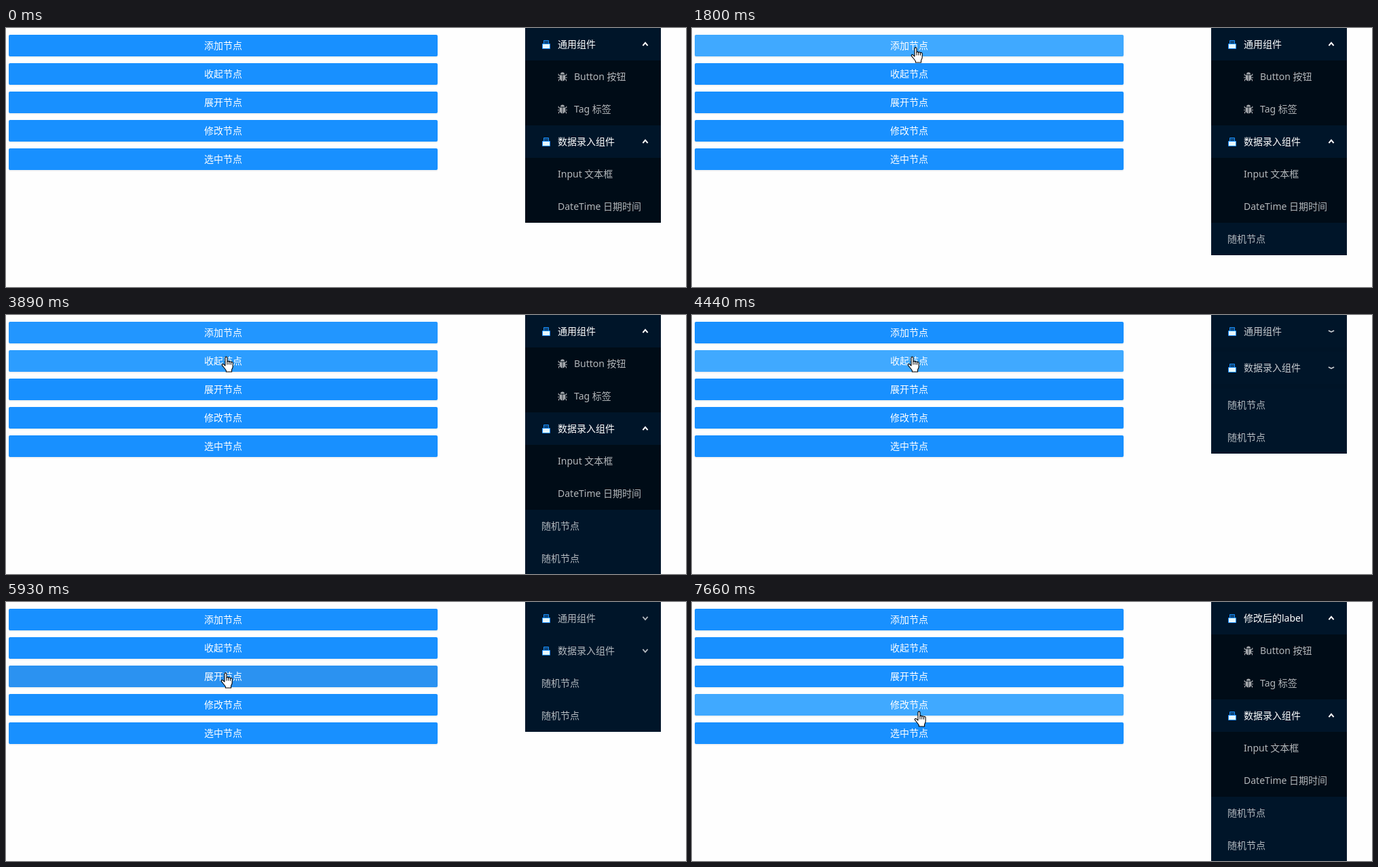
These frames come from a looping animation (1002 by 383 pixels, 8000 ms). An HTML page:

```html
<!DOCTYPE html>
<html lang="zh-CN">
<head>
<meta charset="utf-8">
<title>菜单节点</title>
<style>
  html, body { margin: 0; width: 100%; height: 100%; overflow: hidden; background: #fefefe; }
  body { position: relative; font: 14px 'Noto Sans', 'Noto Sans CJK SC', sans-serif; }
  svg { position: absolute; overflow: visible; }
  .button {
    position: absolute; left: 4px; width: 632px; height: 32px; line-height: 32px;
    border-radius: 2px; box-shadow: 0 2px 0 rgba(0, 0, 0, .045);
    color: #fff; text-align: center;
  }
  #menu { position: absolute; left: 765px; top: 0; width: 200px; background: #001529; color: rgba(255, 255, 255, .7); }
  .item { position: relative; height: 48px; line-height: 48px; padding-left: 24px; white-space: pre; }
  .item svg { top: 17px; width: 14px; height: 14px; }
  .icon { padding-left: 48px; }
  .icon svg:first-child { left: 24px; }
  .sub { overflow: hidden; background: #000c17; }
  .sub .item { padding-left: 48px; }
  .sub .icon { padding-left: 72px; }
  .sub .icon svg { left: 48px; }
  .item .arrow { left: 177px; top: 24px; width: 1px; height: 1px; }
</style>
</head>
<body>
<div id="menu"></div>
<svg id="cursor" width="18" height="24" fill="#fff" stroke="#000" stroke-linejoin="round">
  <path id="pointer" d="M.5.5V16.5L4.2 13 6.6 18.6 9 17.6 6.6 12H11.5Z"/>
  <g id="hand">
    <path stroke-width="1.1" d="M6 14V2.4a1.5 1.5 0 0 1 3 0V8.4a1.4 1.4 0 0 1 2.8.3 1.4 1.4 0 0 1 2.7.7 1.4 1.4 0 0 1 2.7.8V15.5c0 2-1.3 3-1.6 4.7V23H7.4V21.3c-.8-2-3.4-4.6-5.8-7.6-1.2-1.7.7-2.9 2-1.9Z"/>
    <path fill="none" d="M9 8.5v4M11.8 9v3.5M14.5 9.6v3"/>
  </g>
</svg>
<script>
const usb = `<svg viewBox="0 0 14 14" stroke="#1890ff">
  <path fill="#0b3a66" d="M3.5 7V1.5H10.5V7"/><path d="M5.2 3.8h1M7.8 3.8h1"/>
  <path fill="#e6f7ff" d="M1.5 6.5h11v7h-11z"/></svg>`;
const bug = `<svg viewBox="0 0 14 14" fill="#a6a9ad" stroke="#a6a9ad">
  <path stroke="none" d="M4 3.6a3 3 0 0 1 6 0ZM3 4.6H6.6V13.4C4.2 13 3 11.4 3 9ZM7.4 4.6H11V9C11 11.4 9.8 13 7.4 13.4Z"/>
  <path fill="none" stroke-width="1.1" d="M3 5.6 1.2 4.6V2.8M11 5.6l1.8-1V2.8M0 8.3H3M11 8.3h3M3.4 10.2 1.5 11.5v2M10.6 10.2l1.9 1.3v2"/></svg>`;
const arrow = '<svg class="arrow"><polyline fill="none"/></svg>';

const item = (text, icon = '', extra = '', kind = '') =>
  `<div class="item ${icon && 'icon'} ${kind}">${icon}<span>${text}</span>${extra}</div>`;
const group = (title, items) =>
  item(title, usb, arrow, 'title') + `<div class="sub">${items.join('')}</div>`;

const all = selector => [...document.querySelectorAll(selector)];
const menu = document.getElementById('menu');
menu.innerHTML =
  group('通用组件', [item('Button 按钮', bug), item('Tag 标签', bug)]) +
  group('数据录入组件', [item('Input 文本框'), item('DateTime 日期时间')]) +
  item('随机节点', '', '', 'added').repeat(2);

const buttons = ['添加', '收起', '展开', '修改', '选中'].map((verb, i) => {
  const button = document.createElement('div');
  button.className = 'button';
  button.style.top = 10 + 42 * i + 'px';
  button.textContent = verb + '节点';
  menu.before(button);
  return button;
});
const [subs, titles, arrows, added] = ['.sub', '.title', '.arrow polyline', '.added'].map(all);
const label = titles[0].querySelector('span');
const [cursor, pointer, hand] = ['cursor', 'pointer', 'hand'].map(id => document.getElementById(id));

const TICK = 120; // every transition advances in visible steps of this length
const steps = (t, start, count) =>
  Math.min(1, Math.max(0, (Math.floor((t - start) / TICK) + 1) / count));
const smooth = k => k * k * (3 - 2 * k);
const easeOut = k => 1 - (1 - k) ** 3.9;
const mix = (a, b, k) => a.map((v, i) => v + (b[i] - v) * k);

const BASE = [24, 144, 255], HOVER = [64, 169, 255], PRESSED = [9, 109, 217];
const hoverStarts = [1040, 3890, 5510, 6750];
const FOLD = 4290, EXPAND = 5930, RENAME = 7660;
const moves = [
  { start: 500, count: 1, to: [701, 251] },
  { start: 650, count: 2, to: [626, 97] },
  { start: 920, count: 3, to: [322, 28] },
  { start: 3650, count: 3, to: [317, 61] },
  { start: 5240, count: 4, to: [316, 104] },
  { start: 6630, count: 2, to: [346, 177] },
  { start: 6870, count: 3, to: [327, 161] }
];

function drawButtons(t) {
  buttons.forEach((button, i) => {
    const enter = smooth(steps(t, hoverStarts[i] ?? Infinity, 2));
    const leave = smooth(steps(t, (hoverStarts[i + 1] ?? Infinity) - TICK, 3));
    const pressed = i === 2 && t >= EXPAND && t < EXPAND + TICK;
    const color = mix(mix(BASE, HOVER, enter - leave), PRESSED, pressed ? .38 : 0);
    button.style.background = `rgb(${color.map(Math.round)})`;
  });
}

function drawMenu(t) {
  const expanded = smooth(steps(t, EXPAND + TICK, 3));
  const open = 1 - easeOut(steps(t, FOLD + 150, 2)) + expanded;
  const bright = 1 - smooth(steps(t, FOLD, 3)) + expanded;
  const turn = 2 * bright - 1;
  const color = `rgba(255, 255, 255, ${.7 + .3 * bright})`;
  const wide = 4.6 - Math.abs(turn), rise = 2.1 * turn;
  subs.forEach((sub, i) => {
    sub.style.height = 96 * open + 'px';
    sub.style.opacity = open;
    titles[i].style.color = color;
    arrows[i].setAttribute('points', `${-wide},${rise} 0,${-rise} ${wide},${rise}`);
    arrows[i].setAttribute('stroke', color);
    arrows[i].setAttribute('stroke-width', 1.7 + .3 * bright);
  });
  added.forEach((node, i) => node.hidden = t < 1800 + 870 * i);
  label.textContent = t < RENAME ? '通用组件' : '修改后的label';
}

function drawCursor(t) {
  const [x, y] = moves.reduce(
    (from, { start, count, to }) => mix(from, to, smooth(steps(t, start, count))), [-50, -50]);
  const overButton = x > 0 && x < 636 && (y - 10) % 42 < 32;
  cursor.style.left = Math.round(x) + 'px';
  cursor.style.top = Math.round(y) + 'px';
  hand.style.display = overButton ? '' : 'none';
  pointer.style.display = overButton ? 'none' : '';
}

function draw() {
  const t = performance.now() % 8000;
  drawButtons(t);
  drawMenu(t);
  drawCursor(t);
  requestAnimationFrame(draw);
}
draw();
</script>
</body>
</html>
```
